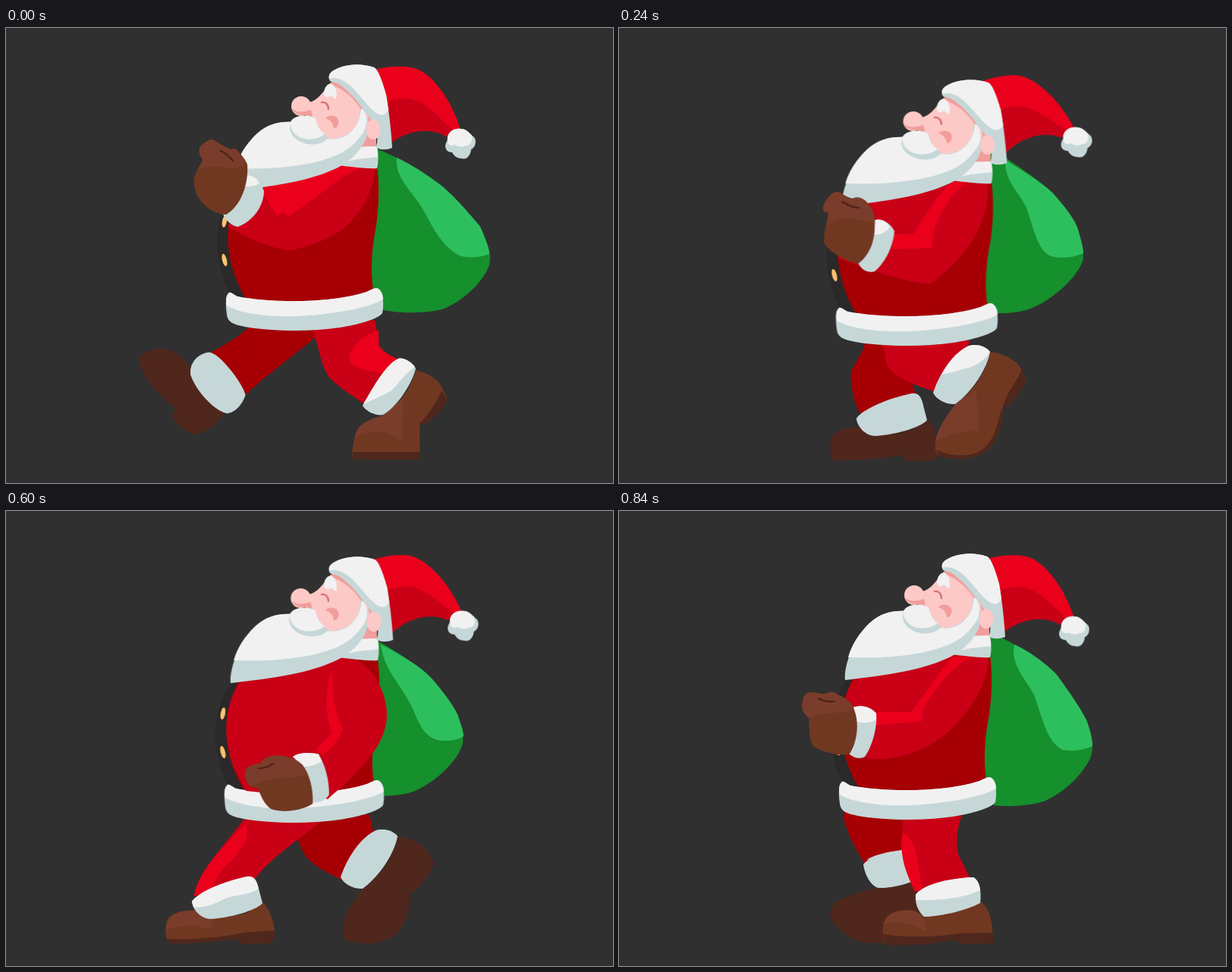
An HTML page that plays this animation: 800x600 px, repeating every 0.96 s.

```html
<!DOCTYPE html>
<html lang="en">
<head>
<meta charset="utf-8">
<title>Walking Santa</title>
<style>
html, body { margin: 0; width: 100%; height: 100%; overflow: hidden; background: #303030; }
svg { display: block; width: 100%; height: 100%; }

.near { --pants: #c90016; --shine: #eb001b; --fur: #f1f1f1; --boot: #713821; --toe: #7b3d2b; }
.far { --pants: #a60004; --shine: #a60004; --fur: #c6d7d8; --boot: #50271c; --toe: #50271c; }
.pants { fill: var(--pants); }
.shine { fill: var(--shine); }
.fur { fill: var(--fur); }
.boot { fill: var(--boot); }
.toe { fill: var(--toe); }
.sole { fill: #50271c; }
.white { fill: #f1f1f1; }
.grey { fill: #c6d7d8; }
.dark { fill: #a60004; }
.mid { fill: #c90016; }
.red { fill: #eb001b; }
.skin { fill: #fdc9c7; }
.blush { fill: #f19d9b; }
.glove { fill: #713821; }
.thumb { fill: #7b3d2b; }
.green { fill: #168f2d; }
.leaf { fill: #2dbf5e; }
.crease { fill: none; stroke: #4d2218; stroke-width: 2.2; stroke-linecap: round; }

/* Each child of a cycle is shown for one of eight steps. */
.cycle > * { animation: show .96s step-end infinite; animation-delay: calc((var(--i) - 8) * .12s); }
.cycle > :nth-child(1) { --i: 0; }
.cycle > :nth-child(2) { --i: 1; }
.cycle > :nth-child(3) { --i: 2; }
.cycle > :nth-child(4) { --i: 3; }
.cycle > :nth-child(5) { --i: 4; }
.cycle > :nth-child(6) { --i: 5; }
.cycle > :nth-child(7) { --i: 6; }
.cycle > :nth-child(8) { --i: 7; }
@keyframes show { 0% { visibility: visible; } 12.5%, 100% { visibility: hidden; } }

.bob { transform-origin: 428px 0; animation: bob .48s step-end infinite; }
@keyframes bob {
  0%, 100% { transform: none; }
  25% { transform: translateY(12px) scaleX(1.015); }
  50% { transform: translateY(20px) scaleX(1.029); }
  75% { transform: translateY(8px); }
}
/* Arm poses are drawn in stage coordinates, so they cancel the bob. */
.stage > :nth-child(4n+2) { transform: matrix(.985, 0, 0, 1, 6.4, -12); }
.stage > :nth-child(4n+3) { transform: matrix(.972, 0, 0, 1, 12, -20); }
.stage > :nth-child(4n+4) { transform: translateY(-8px); }

.tail { transform-origin: 495px 100px; animation: swing .48s step-end infinite; }
.pom { transform-origin: 599px 152px; animation: level .48s step-end infinite; }
@keyframes swing {
  0%, 100% { transform: none; }
  25% { transform: translate(-4px, -2px) rotate(-6deg); }
  50% { transform: translate(-8px, -4px) rotate(-9.5deg); }
  75% { transform: rotate(-1deg); }
}
@keyframes level {
  0%, 100% { transform: none; }
  25% { transform: rotate(6deg); }
  50% { transform: rotate(9.5deg); }
  75% { transform: rotate(1deg); }
}
</style>
</head>
<body>
<svg viewBox="0 0 800 600">
<defs>
  <clipPath id="belly"><path d="M540 170H330L312 212C303 222 296 240 293 262C290 290 297 325 316 357V420H540Z"/></clipPath>

  <g id="leg0">
    <path class="pants" d="M400 385L486 385C488 400 494 412 491 418C497 428 508 433 518 437L476 499C455 483 432 470 424 458C414 440 412 420 405 400Z"/>
    <path class="shine" d="M491 399C470 405 455 420 452 435C455 448 472 452 500 455L516 437C508 433 497 428 491 418Z"/>
    <path class="boot" d="M540 451C555 455 570 462 575 475L582 490C575 502 562 516 552 523L546 520C544 530 546 545 545 569H457C455 560 458 545 461 535C463 525 475 516 495 512C515 500 535 475 540 451Z"/>
    <path class="toe" d="M460 540C463 525 475 516 495 512L524 488C523 515 523 530 521 545C505 530 480 528 460 540Z"/>
    <path class="sole" d="M457 559H545V569H457ZM574 478L582 490C575 502 562 516 552 523L546 521C556 510 570 490 574 478Z"/>
    <path class="grey" d="M517 436C524 434 536 441 540 449C535 470 515 500 497 510C488 512 475 506 470 498C484 474 500 444 517 436Z"/>
    <path class="fur" d="M517 436C524 434 534 440 539 447C522 458 514 476 503 481C493 486 482 491 471 496C484 474 500 444 517 436Z"/>
  </g>
  <g id="leg1">
    <path class="pants" d="M375 402L478 400C484 415 482 422 486 428L446 488C425 478 405 468 395 455C385 440 383 425 375 402Z"/>
    <use href="#raised" transform="translate(27 2)"/>
  </g>
  <g id="leg2">
    <path class="pants" d="M344 410L462 412C460 430 430 450 418 480C390 472 365 460 355 448C350 440 352 425 344 410Z"/>
    <g id="raised">
      <path class="boot" d="M488 427C505 428 525 438 530 450L537 463C530 480 518 492 512 500L506 498C505 520 500 545 485 558C465 570 440 570 422 564C414 558 416 545 420 535C428 520 437 505 445 494C465 480 485 455 488 427Z"/>
      <path class="toe" d="M417 545C420 525 437 505 445 494L470 478C474 500 475 520 473 532C455 530 435 535 417 545Z"/>
      <path class="sole" d="M531 450L537 463C530 480 518 492 512 500L506 498C512 480 525 465 531 450ZM505 500C505 520 500 545 485 558C465 570 440 570 422 564L418 556C440 566 470 568 485 550C498 535 500 515 505 500Z"/>
      <path class="grey" d="M459 420C468 416 482 418 489 427C485 450 465 480 443 496C432 497 418 490 414 481C420 462 436 432 459 420Z"/>
      <path class="fur" d="M459 420C468 416 482 418 489 427C482 440 466 448 452 450C443 454 434 455 425 457C433 442 445 427 459 420Z"/>
    </g>
  </g>
  <g id="leg3">
    <path class="pants" d="M297 392L404 400C396 415 391 430 391 437L396 450L324 466C315 450 302 430 296 405Z"/>
    <path class="boot" d="M412 470C420 478 428 488 432 495C434 510 433 520 430 527C420 532 410 530 398 532C380 535 365 545 350 560C340 568 320 567 305 562C290 555 278 540 278 528C280 518 300 508 318 504C330 503 338 500 342 495C365 496 395 488 412 470Z"/>
    <path class="toe" d="M282 519C295 508 318 504 340 496H358C358 520 350 535 338 542C320 535 300 525 282 519Z"/>
    <path class="sole" d="M278 528C282 550 310 568 340 561C355 548 370 530 398 524C410 518 425 520 433 516L430 527L404 534C380 535 365 545 352 568C330 574 290 568 278 528Z"/>
    <path class="grey" d="M322 466C330 455 360 446 398 446C408 450 414 462 413 473C395 488 365 498 342 497C332 495 324 480 322 466Z"/>
    <path class="fur" d="M326 460C345 449 375 446 398 446C405 449 411 456 413 464C390 468 360 468 351 456Z"/>
  </g>
  <g id="leg4">
    <path class="pants" d="M320 390H424C395 420 345 460 320 488L270 436C290 423 310 410 322 395Z"/>
    <path class="shine" d="M320 398C325 410 325 422 322 430C314 437 306 444 303 456L272 434C290 423 310 410 320 398Z"/>
    <path class="boot" d="M249 460C240 445 225 434 203 433C190 436 180 442 178 447C180 465 205 495 230 510L227 521C232 533 250 543 258 543C272 538 285 530 293 515L299 510C278 508 255 485 249 460Z"/>
    <path class="toe" d="M183 442C190 436 203 433 215 434C230 438 240 448 249 460L245 480C235 465 215 458 190 463Z"/>
    <path class="sole" d="M182 443C178 446 178 450 179 455C185 470 205 495 230 510L227 521C232 533 250 543 258 543L272 536C262 530 262 526 260 524C255 515 235 508 225 500C205 487 185 465 182 443Z"/>
    <path class="grey" d="M270 434C285 436 315 470 321 487C318 500 308 512 298 513C280 510 255 485 247 465C245 450 255 436 270 434Z"/>
    <path class="fur" d="M270 434C285 436 306 462 314 483C300 487 270 490 247 462C245 450 255 436 270 434Z"/>
  </g>
  <g id="leg5">
    <path class="pants" d="M318 400L425 402C390 430 345 460 326 488L248 508C252 475 290 440 318 400Z"/>
    <path class="shine" d="M316 412C322 430 312 445 298 460C285 472 275 484 270 502L248 508C252 475 290 440 316 412Z"/>
    <use href="#planted" transform="translate(-68 0)"/>
  </g>
  <g id="leg6">
    <path class="pants" d="M324 408L450 412C420 430 395 455 386 468L392 486L317 508C310 490 304 470 306 452C312 440 322 428 324 415Z"/>
    <path class="shine" d="M322 430C312 440 304 450 306 466C308 485 312 495 317 508L342 495C345 480 355 470 358 462C350 450 335 440 322 430Z"/>
    <g id="planted">
      <path class="boot" d="M404 514C414 522 420 538 422 552C422 565 418 568 415 570L380 571L372 564C350 566 320 571 282 570C277 560 277 545 282 537C290 528 305 526 320 527C330 535 345 536 360 535C380 533 395 528 404 514Z"/>
      <path class="toe" d="M279 552C280 528 305 526 320 527L337 536C342 545 340 550 338 552C320 545 300 545 279 552Z"/>
      <path class="sole" d="M279 564C310 566 360 562 380 556L422 553C422 565 418 568 415 570L380 571L372 564C350 566 320 571 282 570Z"/>
      <path class="grey" d="M313 515C320 504 352 489 386 482C394 481 398 486 400 494L406 517C402 524 370 536 338 538C325 538 314 526 313 515Z"/>
      <path class="fur" d="M313 515C320 504 352 489 386 482C394 481 398 486 401 498C385 508 370 505 355 512C340 520 325 524 315 522Z"/>
    </g>
  </g>
  <g id="leg7">
    <path class="pants" d="M375 400H452C444 425 444 440 448 455C455 468 460 478 463 487L390 502C385 485 375 465 372 440Z"/>
    <path class="shine" d="M374 424C383 430 390 440 392 455C396 470 396 485 400 498L390 502C380 480 368 455 374 424Z"/>
    <path class="boot" d="M475 514C488 522 493 540 493 570L450 571L443 565C420 568 400 573 350 572C346 560 347 545 352 537C358 528 372 525 388 527L402 533C425 533 455 526 475 514Z"/>
    <path class="toe" d="M348 545C355 528 372 525 388 527C398 532 405 540 405 554C385 542 365 540 348 545Z"/>
    <path class="sole" d="M348 558C380 563 420 562 447 557L493 556V570L450 571L443 565C420 570 400 573 350 572Z"/>
    <path class="grey" d="M391 506C400 493 435 484 467 483C475 487 478 500 476 517C455 528 420 535 402 535C394 528 390 518 391 506Z"/>
    <path class="fur" d="M391 506C400 493 435 484 467 483C473 487 475 492 476 500C455 510 425 514 391 513Z"/>
  </g>
</defs>

<g class="cycle">
  <g>
    <path class="green" d="M470 158H485C520 172 545 186 570 205C590 220 615 250 625 262C637 290 640 300 637 312C632 330 605 360 575 371C550 377 515 376 498 372L470 360Z"/>
    <path class="leaf" d="M515 171C538 182 552 192 570 205C590 220 615 250 625 262C632 278 637 290 637 298C625 303 610 303 600 301C575 290 562 262 550 240C535 215 512 197 515 171Z"/>
  </g>
  <g>
    <path class="green" d="M470 160H495C525 178 550 194 570 211C590 230 608 252 615 265C624 288 626 300 624 311C616 332 585 361 557 371C535 377 512 377 498 374L470 360Z"/>
    <path class="leaf" d="M511 171C535 185 553 197 570 211C590 230 608 252 615 265C620 279 624 290 624 298C612 303 597 303 585 301C565 292 555 266 544 240C532 217 510 200 511 171Z"/>
  </g>
  <g>
    <path class="green" d="M470 165H500C535 188 560 206 572 218C590 238 602 255 605 266C612 290 613 300 611 308C600 335 565 362 540 371C520 377 505 376 495 376L470 360Z"/>
    <path class="leaf" d="M509 174C535 190 560 206 572 218C590 238 602 255 605 266C609 280 612 290 612 297C600 302 585 305 570 301C553 295 548 270 538 240C530 218 508 205 509 174Z"/>
  </g>
  <g>
    <path class="green" d="M470 168H488C525 188 550 208 560 221C580 245 593 265 596 278C601 300 602 310 601 318C595 345 560 375 530 386C515 390 495 389 490 388L470 360Z"/>
    <path class="leaf" d="M498 175C525 190 550 208 560 221C580 245 593 265 596 278C600 290 602 300 602 310C595 314 585 316 570 316C550 312 540 285 530 250C524 230 500 205 498 175Z"/>
  </g>
  <g>
    <path class="green" d="M470 170H480C520 195 545 211 560 228C580 250 588 262 591 270C600 290 602 300 601 306C595 330 560 360 535 370C515 375 500 375 494 374L470 360Z"/>
    <path class="leaf" d="M480 172C520 195 545 211 560 228C580 250 588 262 591 270C597 283 601 290 601 297L580 302C570 303 552 300 541 284C525 260 520 235 490 205Z"/>
  </g>
  <g>
    <path class="green" d="M470 170H488C527 193 550 208 562 222C582 245 594 264 596 271C602 290 603 300 602 306C596 332 560 361 537 370C517 376 500 376 494 375L470 360Z"/>
    <path class="leaf" d="M494 176C527 193 550 208 562 222C582 245 594 264 596 271C600 283 603 290 603 297C597 301 588 303 577 303C560 303 548 292 538 265C523 230 498 212 494 176Z"/>
  </g>
  <g>
    <path class="green" d="M470 170H500C535 190 555 205 565 216C585 240 598 258 601 268C605 285 605 300 604 305C598 335 560 362 540 369C520 376 500 376 494 376L470 360Z"/>
    <path class="leaf" d="M502 174C535 190 555 205 565 216C585 240 598 258 601 268C604 280 605 290 605 297C600 300 590 304 575 303C552 300 545 275 535 245C525 220 505 205 502 174Z"/>
  </g>
  <g>
    <path class="green" d="M470 165H500C530 180 560 198 576 215C595 240 613 268 617 278C624 300 625 308 623 320C618 340 590 370 560 383C535 390 510 390 494 388L470 360Z"/>
    <path class="leaf" d="M521 176C535 182 560 198 576 215C595 240 613 268 617 278C621 290 624 300 624 310C615 314 600 318 585 315C565 305 560 280 548 245C540 225 515 205 521 176Z"/>
  </g>
</g>

<g class="cycle far">
  <use href="#leg4" transform="rotate(3.6 370 400)"/>
  <use href="#leg5"/><use href="#leg6"/><use href="#leg7"/>
  <use href="#leg0"/><use href="#leg1"/><use href="#leg2"/><use href="#leg3"/>
</g>
<g class="cycle near">
  <use href="#leg0"/><use href="#leg1"/><use href="#leg2"/><use href="#leg3"/>
  <use href="#leg4"/><use href="#leg5"/><use href="#leg6"/><use href="#leg7"/>
</g>

<g class="bob">
  <g class="tail">
    <path class="red" d="M480 56C505 50 525 49 542 54C560 62 575 82 585 100C592 115 597 125 599 136L580 143C555 128 525 138 506 152L490 140Z"/>
    <path class="mid" d="M490 102C510 92 528 90 542 96C562 104 577 127 594 137L580 143C555 128 525 138 506 152L490 140Z"/>
    <g class="pom">
      <path class="grey" d="M582 148C580 138 590 131 600 133C606 133 612 140 617 144C621 150 618 158 613 160C612 170 606 174 600 172C594 172 590 168 588 164C578 164 577 154 582 148Z"/>
      <path class="white" d="M582 151C580 138 590 131 600 133C606 133 611 138 614 142C615 150 612 155 606 155C600 158 594 156 592 154C588 156 584 155 582 151Z"/>
    </g>
  </g>

  <path fill="#2a2828" d="M300 213C285 235 278 260 278 285C280 315 290 345 300 358H320L315 212Z"/>
  <g fill="#fdc26d">
    <ellipse cx="288" cy="255" rx="3" ry="8" transform="rotate(10 288 255)"/>
    <ellipse cx="288" cy="306" rx="3" ry="8.5" transform="rotate(-14 288 306)"/>
  </g>
  <path class="dark" d="M440 178L489 182C492 205 492 230 488 260C482 290 480 320 484 346V365H318L316 357C297 325 290 290 293 262C296 240 303 222 312 205Z"/>
  <path class="grey" d="M294 349C288 355 290 368 291 378C292 388 300 391 315 394C350 400 400 401 440 395C465 391 490 384 496 376C498 366 498 352 491 344C487 341 482 345 475 348C430 363 350 363 305 354C300 352 297 348 294 349Z"/>
  <path class="white" d="M294 349C289 353 290 360 291 366C310 378 360 383 400 379C440 376 480 368 497 358C497 352 495 347 491 344C487 341 482 345 475 348C430 363 350 363 305 354C300 352 297 348 294 349Z"/>

  <g clip-path="url(#belly)"><g class="cycle stage">
    <g>
      <path class="mid" d="M440 175L487 180C486 215 465 250 440 268C415 283 390 291 374 293C345 290 315 276 285 258L300 200Z"/>
      <path class="red" d="M330 205L440 175L472 183C450 190 432 205 410 222L372 248L365 242L357 248Z"/>
    </g>
    <g>
      <path class="mid" d="M440 186L488 192C486 220 472 255 448 282C425 305 405 314 393 316C360 312 325 300 280 280L295 212Z"/>
      <path class="red" d="M338 235L400 215L440 190L464 193C445 210 425 230 411 256L385 266L358 272Z"/>
    </g>
    <g>
      <path class="mid" d="M440 195L486 200C488 230 480 265 455 295C440 315 420 330 410 338C380 335 345 325 280 300L290 220Z"/>
      <path class="red" d="M440 203C425 213 404 245 388 272H360V292L412 290C412 270 420 250 430 235C440 218 450 210 458 203Z"/>
    </g>
    <g>
      <path class="mid" d="M440 185L470 190C488 200 490 225 485 255C478 290 465 325 455 338C430 348 400 352 383 355L305 349L270 300L290 215Z"/>
      <path class="red" d="M436 195C422 205 412 235 407 288L385 294V305C405 300 425 282 434 275C432 255 432 240 436 225C440 205 445 198 452 191Z"/>
    </g>
    <g>
      <path class="mid" d="M300 200L440 178L455 184C475 190 490 210 500 225C515 250 518 285 517 305C505 320 495 330 485 340L458 353C420 361 350 361 316 357L280 300Z"/>
      <path class="red" d="M425 203C420 225 425 260 448 289L441 302L455 303L468 275L457 270C440 245 430 225 425 203Z"/>
    </g>
    <g>
      <path class="mid" d="M300 215L440 188L458 195C482 203 500 235 502 265C503 290 490 315 470 335C455 355 440 365 424 380L400 372C370 373 340 372 316 369L280 300Z"/>
      <path class="red" d="M430 208C420 235 420 270 430 292L408 315L418 322C430 312 440 300 444 286C432 265 430 240 430 208Z"/>
    </g>
    <g>
      <path class="mid" d="M300 220L440 195L478 203C490 215 494 243 487 266C480 300 460 335 440 352C430 362 420 372 410 381L390 386L384 381C360 381 335 380 312 376L270 320Z"/>
      <path class="red" d="M432 215C418 235 412 265 409 295C400 310 388 322 374 330L385 338C400 322 412 308 419 296C420 270 425 245 432 215Z"/>
    </g>
    <g>
      <path class="mid" d="M440 183L487 192C488 215 475 245 450 275C425 305 390 322 350 327C335 328 320 326 300 320L280 240L310 210Z"/>
      <path class="red" d="M440 192C420 215 405 240 385 265H336V283L400 277C397 262 408 248 420 232C435 212 450 200 463 193Z"/>
    </g>
  </g></g>

  <path class="blush" d="M462 106H488V160H458Z"/>
  <path class="grey" d="M458 157L489 156C491 165 491 178 489 185C475 186 455 183 438 181Z"/>
  <path class="white" d="M458 157L489 156L490 170C478 172 462 172 450 176Z"/>
  <path class="skin" d="M428 72L440 68C460 80 475 100 478 122C474 145 440 155 415 146L394 118L399 98C408 97 414 89 420 82Z"/>
  <path class="blush" d="M426 74L440 66C460 78 472 98 472 120L467 106C458 92 445 80 426 74Z"/>
  <path class="grey" d="M466 107C477 110 479 130 475 144C469 161 456 173 441 182C412 198 372 205 338 210L298 215C296 195 310 160 330 140C345 126 362 123 378 124L424 146C445 148 466 135 466 107Z"/>
  <path class="white" d="M468 106C476 110 478 128 470 139C460 153 448 164 430 170C400 182 350 187 302 185C306 170 316 153 330 140C345 126 362 123 378 124L424 146C445 150 466 135 468 106Z"/>
  <circle class="skin" cx="389" cy="103" r="13"/>
  <path class="blush" d="M377 106C383 112 392 111 402 108L404 117C394 113 382 118 377 106Z"/>
  <path class="grey" d="M375 124C380 114 398 114 408 119C410 132 420 140 425 145C415 156 395 156 383 147C373 140 373 130 375 124Z"/>
  <path class="white" d="M375 124C380 114 398 114 408 119C410 130 414 135 420 140C408 149 392 148 384 142C377 137 374 130 375 124Z"/>
  <path class="white" d="M419 85C420 77 425 72 430 74C435 78 437 86 435 94C431 93 431 89 427 90C423 93 419 91 419 85Z"/>
  <path d="M416 98C421 97 425 101 425 107" fill="none" stroke="#d9757a" stroke-width="2.4" stroke-linecap="round"/>
  <path class="blush" d="M421 119C425 113 436 115 438 121C440 128 435 133 432 132C431 126 428 121 421 119Z"/>
  <path class="grey" d="M426 68C424 60 430 56 440 52C455 47 470 47 485 52C490 54 496 70 501 88C505 110 508 140 509 158C500 162 490 160 487 157C492 150 489 130 478 117C468 104 455 84 437 73C432 70 428 73 426 68Z"/>
  <path class="white" d="M426 67C424 60 430 56 440 52C455 47 470 47 485 52C490 54 496 70 501 88L504 108C501 114 497 116 492 114C485 112 475 100 465 88C455 75 440 62 426 67Z"/>
  <ellipse class="skin" cx="484" cy="134" rx="9.5" ry="13"/>

  <g class="cycle stage">
    <g>
      <path class="grey" d="M313 195C325 192 335 200 340 215C340 235 325 255 306 262C298 262 288 252 286 245C300 240 312 220 313 195Z"/>
      <path class="white" d="M314 195C322 192 331 198 334 205C328 209 320 209 312 209Z"/>
      <path class="glove" d="M255 158C258 154 266 146 273 147C280 152 288 157 296 160L302 159C306 162 315 172 318 180C320 205 310 235 290 246C275 247 250 230 248 207C247 195 252 185 260 174C256 170 254 166 255 158Z"/>
      <path class="thumb" d="M255 158C258 154 266 146 273 147C280 152 288 157 296 160L302 159C306 162 315 172 318 180C300 190 275 178 254 186L260 174C256 170 254 166 255 158Z"/>
      <path class="crease" d="M283 162C290 165 295 170 299 175"/>
    </g>
    <g><use href="#hand2" transform="translate(-13 -29) rotate(6 340 286)"/></g>
    <g><g id="hand2">
      <path class="grey" d="M336 254C345 250 358 257 363 268C361 290 350 310 337 321C328 324 318 318 315 309C330 300 338 280 336 254Z"/>
      <path class="white" d="M336 254C343 250 352 254 357 262C352 270 345 272 337 273Z"/>
      <path class="glove" d="M269 236C272 226 280 215 290 216C296 220 302 224 308 225C314 222 320 224 325 228C334 237 338 247 337 258C338 280 330 300 315 311C300 308 275 295 270 282C270 265 275 255 276 243C270 243 268 240 269 236Z"/>
      <path class="thumb" d="M269 236C272 226 280 215 290 216C296 220 302 224 308 225C314 222 320 224 325 228C334 237 338 247 337 258C315 252 295 246 274 260L276 243C270 243 268 240 269 236Z"/>
      <path class="crease" d="M294 229C302 234 308 237 316 237"/>
    </g></g>
    <g>
      <path class="grey" d="M352 289C362 284 378 286 386 292C389 310 388 335 381 352C373 357 363 356 355 351C365 335 365 310 352 289Z"/>
      <path class="white" d="M352 289C362 284 378 286 386 292L387 303C380 307 370 308 362 306Z"/>
      <path class="glove" d="M283 289C284 281 290 278 300 277C306 278 312 277 316 273C326 273 340 277 347 281C356 289 363 300 364 318C364 335 360 350 355 352C340 355 318 352 305 342C299 332 299 320 296 312C286 310 282 300 283 289Z"/>
      <path class="thumb" d="M283 289C284 281 290 278 300 277C306 278 312 277 316 273C326 273 340 277 347 281C353 287 358 294 361 304C340 305 318 312 296 312C286 310 282 300 283 289Z"/>
      <path class="crease" d="M304 285C312 288 320 287 327 285"/>
    </g>
    <g>
      <path class="grey" d="M404 307C412 300 425 297 437 300C450 310 458 330 459 346C455 356 445 360 435 359C437 335 425 315 404 307Z"/>
      <path class="white" d="M404 307C412 300 425 297 437 300L446 311C440 314 432 318 424 319Z"/>
      <path class="glove" d="M342 329C345 322 355 318 365 315C366 308 372 306 380 305C395 303 412 309 425 318C435 330 439 345 437 360C425 372 400 376 385 372C372 366 368 355 362 349C350 349 342 340 342 329Z"/>
      <path class="thumb" d="M342 329C345 322 355 318 365 315C366 308 372 306 380 305C395 303 412 309 425 318L432 328C405 345 370 330 346 341C343 337 342 333 342 329Z"/>
      <path class="crease" d="M360 324C368 323 374 321 379 317"/>
    </g>
    <g><use href="#hand6" transform="translate(33 -10) rotate(-2 372 360)"/></g>
    <g><g id="hand6">
      <path class="grey" d="M346 333C355 327 370 328 380 331C388 345 393 365 392 385C386 393 377 396 368 394C371 370 362 348 346 333Z"/>
      <path class="white" d="M346 333C355 327 370 328 380 331L384 341C376 345 368 347 359 347Z"/>
      <path class="glove" d="M282 352C283 344 292 341 304 340C306 333 316 330 326 331C338 332 350 336 358 344C366 354 372 375 370 396C355 405 330 407 315 401C305 394 302 382 298 373C288 373 282 362 282 352Z"/>
      <path class="thumb" d="M282 352C283 344 292 341 304 340C306 333 316 330 326 331C338 332 350 336 358 344L364 358C340 362 315 358 288 370C284 366 282 360 282 352Z"/>
      <path class="crease" d="M300 347C308 347 314 345 320 341"/>
    </g></g>
    <g>
      <path class="grey" d="M306 260C318 254 332 258 339 267C341 285 333 312 324 324C317 328 308 325 303 320C314 305 316 280 306 260Z"/>
      <path class="white" d="M306 260C318 254 332 258 339 267V275C330 280 322 280 314 278Z"/>
      <path class="glove" d="M242 252C243 244 246 238 256 239C264 241 270 242 275 240C281 237 286 240 290 243C300 247 308 253 310 262C317 280 314 305 304 320C290 324 268 318 256 310C250 300 251 285 250 270C242 265 240 260 242 252Z"/>
      <path class="thumb" d="M242 252C243 244 246 238 256 239C264 241 270 242 275 240C281 237 286 240 290 243C300 247 306 252 309 262C290 268 270 264 250 273C242 266 240 260 242 252Z"/>
      <path class="crease" d="M263 247C270 251 277 252 284 251"/>
    </g>
  </g>
</g>
</svg>
</body>
</html>
```
